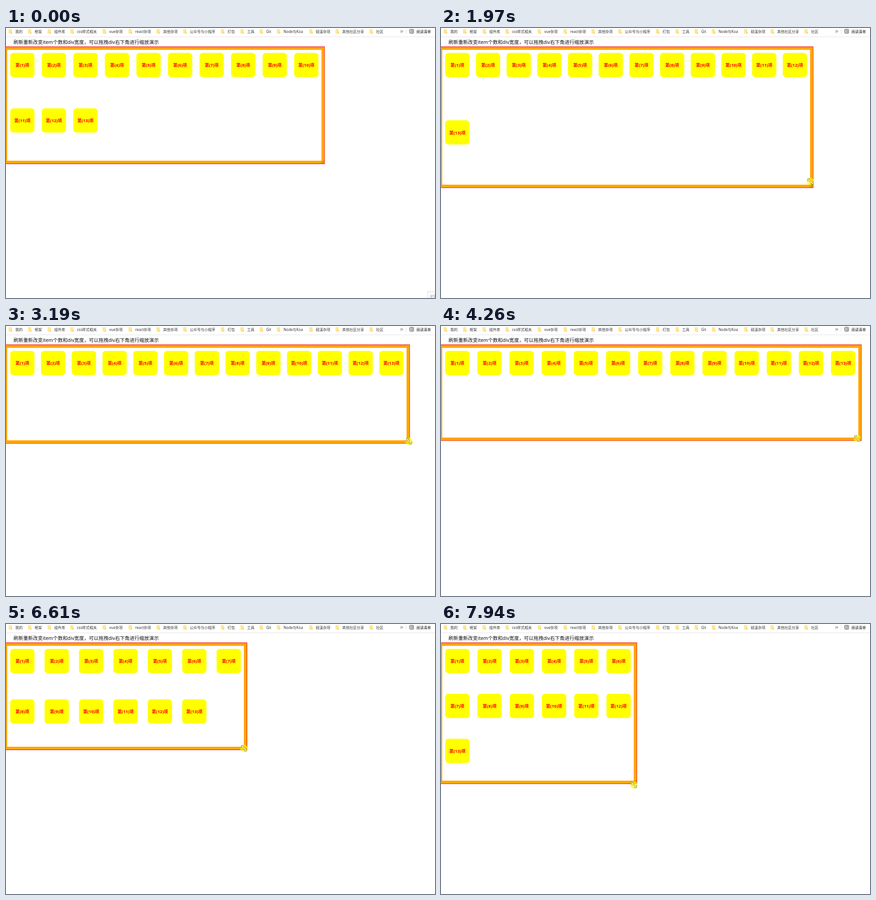
An HTML page for the animation above (8 s loop, 943x594 px).

```html
<!DOCTYPE html>
<html lang="zh-CN">
<head>
<meta charset="utf-8">
<style>
html, body { margin: 0; width: 100%; height: 100%; overflow: hidden; background: #fff; }
svg { display: block; width: 943px; height: 594px; font-family: 'Noto Sans', 'Noto Sans CJK SC', 'Noto Sans CJK', sans-serif; }
.bar { font-size: 8px; fill: #333; }
.tile text { font-size: 9.3px; font-weight: 700; fill: #f00; text-anchor: middle; }
</style>
</head>
<body>
<svg id="stage" viewBox="0 0 943 594" xmlns="http://www.w3.org/2000/svg">
  <g id="bar" class="bar">
    <path d="M0 19.5H943" stroke="#e3e3e3"/>
    <path d="M879.5 2.5V13" stroke="#dcdcdc"/>
    <path d="M867 5l2.4 2.5-2.4 2.5M870 5l2.4 2.5-2.4 2.5" fill="none" stroke="#333" stroke-width=".9"/>
    <rect x="887.5" y="3" width="8.4" height="8.4" rx="1" fill="none" stroke="#333"/>
    <path d="M889 5.2h1.2M889 7.2h1.2M889 9.2h1.2M891 5.2h3.4M891 7.2h3.4M891 9.2h3.4" stroke="#333" stroke-width=".9"/>
    <text x="902" y="10.6" fill="#111">阅读清单</text>
  </g>
  <text x="16.5" y="34.6" font-size="10.7" fill="#111">刷新重新改变item个数和div宽度，可以拖拽div右下角进行缩放演示</text>
  <rect id="line" fill="none" stroke="#ee1515" stroke-width="1.3"/>
  <rect id="frame" fill="none" stroke="#ffa500" stroke-width="6.1"/>
  <path id="grip" d="M-8-1.8L-1.8-8M-4.6-1.8L-1.8-4.6" stroke="#5a4a30" stroke-width=".8"/>
  <g id="tiles"></g>
  <g id="button">
    <rect x="927" y="580.5" width="40" height="20" fill="#fff" stroke="#d2d2dc"/>
    <text x="931" y="593" font-size="8" fill="#aaa">录制</text>
  </g>
  <g id="cursor">
    <circle r="8" fill="#ffff00" fill-opacity=".65"/>
    <path id="arrow" d="M0 0V11.5L2.7 9 4.5 13 6.3 12.2 4.6 8.3H8.2Z" fill="#fff" stroke="#222" stroke-width=".7"/>
    <path id="resize" d="M-6-6H-1L-2.6-4.4 4.4 2.6 6 1V6H1L2.6 4.4-4.4-2.6-6-1Z" fill="#fffbc0" stroke="#75690a" stroke-width=".8"/>
  </g>
</svg>
<script>
const LOOP = 8000, STEP = 67.6, LAST = 117;
const COUNT = 13, SIZE = 53.3, PAD = 6.7, CELL = SIZE + 2 * PAD;
const LEFT = -4.7, TOP = 40.7, EDGE = 7.3;
const $ = id => document.getElementById(id);

function add(parent, tag, attrs, text) {
  const el = document.createElementNS('http://www.w3.org/2000/svg', tag);
  set(el, attrs);
  if (text) el.textContent = text;
  return parent.appendChild(el);
}
function set(el, attrs) {
  for (const k in attrs) el.setAttribute(k, attrs[k]);
}
const move = (el, x, y) => el.setAttribute('transform', `translate(${x.toFixed(2)} ${y.toFixed(2)})`);
const show = (el, on) => el.setAttribute('visibility', on ? 'visible' : 'hidden');

const marks = [
  [20.5, '我的'], [63, '框架'], [106, '组件库'], [156, 'css样式相关'], [227, 'vue杂项'],
  [284, 'react杂项'], [345.5, '其他杂项'], [404, '公众号与小程序'], [487, '打包'], [530, '工具'],
  [572, 'Git'], [610, 'Node与Koa'], [681, '砚溪杂项'], [739, '其他社区分享'], [813.5, '社区']
];
for (const [x, name] of marks) {
  add($('bar'), 'rect', { x: x - 14.6, y: 2.8, width: 7, height: 9.2, rx: .8, fill: '#ffe591' });
  add($('bar'), 'path', { d: `M${x - 7.8} 8.4v3.6h-2.2`, fill: 'none', stroke: '#e9c35a', 'stroke-width': 1 });
  add($('bar'), 'text', { x, y: 10.6 }, name);
}

const tiles = Array.from({ length: COUNT }, (_, i) => {
  const g = add($('tiles'), 'g', { class: 'tile' });
  add(g, 'rect', { width: SIZE, height: SIZE, rx: 6.7, fill: '#ff0' });
  add(g, 'text', { x: SIZE / 2, y: 30.6 }, `第(${i + 1})项`);
  return g;
});

// [step, x, y]: lower right corner of the box while dragged
const corner = [
  [17, 700.8, 299.3], [21, 748, 356], [24, 785, 394], [26, 806, 386], [29, 818.6, 352], [30, 817, 342.5],
  [35, 830, 296], [41, 856, 264], [47, 887.8, 258.8], [48, 891, 258.8], [54, 919, 253.5],
  [58, 925.5, 252.7], [62, 925.5, 252.7], [63, 924.6, 252.7], [64, 920, 252.5], [73, 822, 240],
  [80, 732, 230.6], [81, 717, 231.5], [85, 626, 238], [97, 530.2, 277.3], [98, 528, 278.5],
  [111, 457, 305], [117, 431, 352], [118, 429, 359]
];
// pointer on its way to the handle
const approach = [
  [1, 944, 596], [4, 800, 440], [7, 668, 330], [9, 650, 304], [12, 690, 292.5], [14, 695, 293]
];

// monotone cubic through the keys
function follow(keys, k, c) {
  const n = keys.length - 1;
  if (k <= keys[0][0]) return keys[0][c];
  if (k >= keys[n][0]) return keys[n][c];
  let i = 0;
  while (keys[i + 1][0] <= k) i++;
  const slope = j => (keys[j + 1][c] - keys[j][c]) / (keys[j + 1][0] - keys[j][0]);
  const tangent = j => {
    if (j === 0) return slope(0);
    if (j === n) return slope(n - 1);
    const a = slope(j - 1), b = slope(j);
    return a * b > 0 ? 2 * a * b / (a + b) : 0;
  };
  const [a, b] = [keys[i], keys[i + 1]], h = b[0] - a[0], u = (k - a[0]) / h, v = 1 - u;
  return a[c] * v * v * (1 + 2 * u) + b[c] * u * u * (3 - 2 * u)
    + h * u * v * (v * tangent(i) - u * tangent(i + 1));
}
const at = (keys, k) => [follow(keys, k, 1), follow(keys, k, 2)];

function inset(el, d, right, bottom) {
  set(el, { x: LEFT + d, y: TOP + d, width: right - LEFT - 2 * d, height: bottom - TOP - 2 * d });
}

function layout(right, bottom) {
  inset($('line'), .65, right, bottom);
  inset($('frame'), 4.25, right, bottom);
  move($('grip'), right, bottom);
  const x0 = LEFT + EDGE, y0 = TOP + EDGE;
  const w = right - EDGE - x0, h = bottom - EDGE - y0;
  const cols = Math.max(2, Math.min(COUNT, Math.floor(w / CELL)));
  const rows = Math.ceil(COUNT / cols);
  const dx = (w - CELL) / (cols - 1), dy = Math.max(CELL, h / rows);
  tiles.forEach((g, i) => move(g, x0 + PAD + i % cols * dx, y0 + PAD + Math.floor(i / cols) * dy));
}

function draw(t) {
  const k = Math.min(LAST, Math.floor(t / STEP));
  layout(...at(corner, k));
  // the box trails the pointer by one step
  const [x, y] = k < 17 ? at(approach, k) : at(corner, k + 1).map(v => v - 5);
  move($('cursor'), x, y);
  show($('button'), k < 1);
  show($('cursor'), k > 0);
  show($('arrow'), k > 0 && k < 13);
  show($('resize'), k > 12);
}

const start = performance.now();
function tick() {
  draw((performance.now() - start) % LOOP);
  requestAnimationFrame(tick);
}
tick();
</script>
</body>
</html>
```
